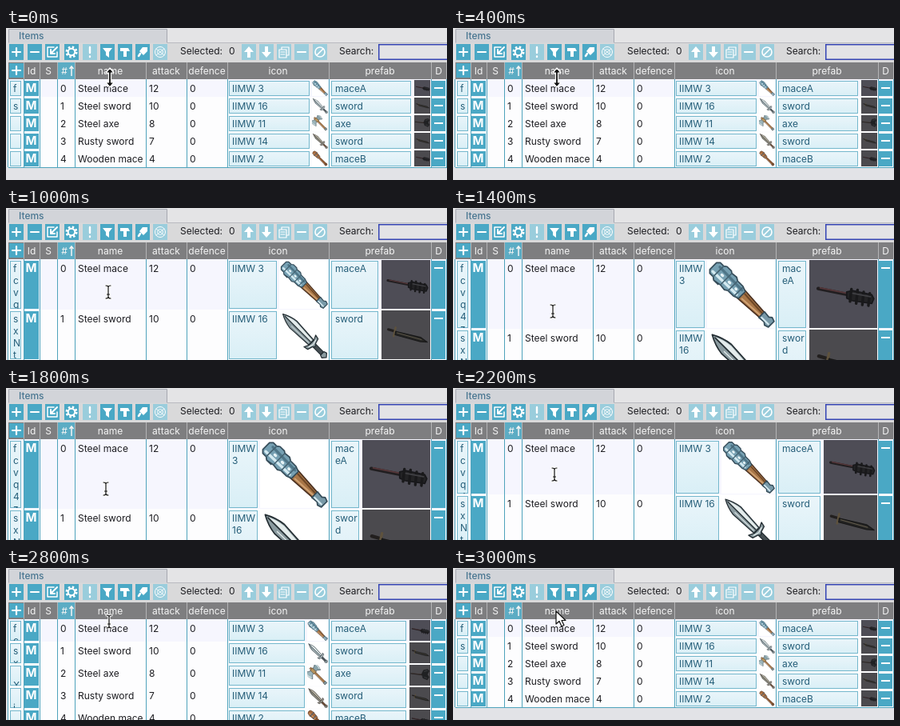
Recreate the animation shown at these times as an HTML page with a canvas. Size 552 px wide and 190 px high, loop 3200 ms.

```html
<!DOCTYPE html>
<html lang="en">
<head>
<meta charset="utf-8">
<title>Item table</title>
<style>
html, body { margin: 0; width: 100%; height: 100%; overflow: hidden; background: #e2e3e7; }
canvas { display: block; }
</style>
</head>
<body>
<canvas id="stage" width="552" height="190"></canvas>
<script>
const c = document.getElementById('stage').getContext('2d');
const TEAL = '#4aa8c5', LINE = '#4fa3bc', INK = '#1c1c20', TOP = 64;
const STEP = 200, LOOP = 3200;

// Row height and pointer x for each step
const heights = [22, 22, 22, 30, 46, 63, 78, 87, 89, 87, 80, 69, 55, 42, 28, 22];
const pointerX = [130, 130, 130, 129, 129, 128, 126, 125, 124, 125, 126, 127, 128, 129, 129, 129];

const edges = [3, 22, 42, 64, 86, 175, 226, 277, 404, 532, 551];
const titles = ['', 'Id', 'S', '#', 'name', 'attack', 'defence', 'icon', 'prefab', 'D'];
const rows = [
  { id: 'fcvq4z', name: 'Steel mace', attack: 12, icon: 'IIMW 3', prefab: 'maceA', art: mace, model: 'mace' },
  { id: 'sxNtLe', name: 'Steel sword', attack: 10, icon: 'IIMW 16', prefab: 'sword', art: sword, model: 'sword' },
  { id: ' XkR', name: 'Steel axe', attack: 8, icon: 'IIMW 11', prefab: 'axe', art: axe, model: 'axe' },
  { id: ' jw', name: 'Rusty sword', attack: 7, icon: 'IIMW 14', prefab: 'sword', art: rustySword, model: 'sword' },
  { id: ' pe', name: 'Wooden mace', attack: 4, icon: 'IIMW 2', prefab: 'maceB', art: woodMace, model: 'mace' }
];

function rect(x, y, w, h, color) {
  c.fillStyle = color;
  c.fillRect(x, y, w, h);
}

function text(s, x, y, color = INK, align = 'left', font = '12px') {
  c.font = font + ' Inter, sans-serif';
  c.textAlign = align;
  c.textBaseline = 'middle';
  c.fillStyle = color;
  c.fillText(s, x, y);
}

function stroke(d, color, width) {
  c.strokeStyle = color;
  c.lineWidth = width;
  c.stroke(new Path2D(d));
}

function fill(d, color) {
  c.fillStyle = color;
  c.fill(new Path2D(d));
}

function shape(d, color, edge = '#26363f', width = 2) {
  fill(d, color);
  stroke(d, edge, width);
}

// Run a drawing in local coordinates, clipped to a box if given
function at(x, y, scale, draw, w, h) {
  c.save();
  c.translate(x, y);
  c.scale(scale, scale);
  if (w) {
    c.beginPath();
    c.rect(0, 0, w, h);
    c.clip();
  }
  c.lineCap = c.lineJoin = 'round';
  draw();
  c.restore();
}

// Weapons on a 100 x 100 field, pointing up before the 45 degree turn
function tilted(draw) {
  c.translate(50, 50);
  c.rotate(-Math.PI / 4);
  draw();
}

function mace() {
  tilted(() => {
    shape('M-8 0H8L5 46H-5Z', '#a87647', '#4a3020');
    stroke('M-4 6L-2 42', '#d0a273', 2.5);
    stroke('M4 4L2 44', '#704928', 2.5);
    shape('M-11 -54L-7 -58H7L11 -54V-47L14 -43V-34L12 -31L13 -22L10 -17L10 -6L7 2H-7L-10 -6L-10 -17L-13 -22L-12 -31L-14 -43V-34V-43L-11 -47Z', '#76a0b2', '#344b58');
    stroke('M-6 -53L-5 -4', '#d4eaf1', 4);
    stroke('M6 -50L5 -3', '#4f7688', 4);
    stroke('M-11 -47H11M-11 -31H11M-10 -17H10M-8 -5H8', '#466473', 2);
    stroke('M0 -40V-38M0 -25V-23M0 -11V-10', '#e5f2f5', 4);
    shape('M-6 43H6L5 53L8 57L6 63H-6L-8 57L-5 53Z', '#7899a8', '#344b58');
    stroke('M-3 46V60', '#d4e8ef', 2.5);
  });
}

function blade(main, light, dark, grip) {
  tilted(() => {
    shape('M0 -60Q8 -46 10 -30L7 22H-7L-10 -30Q-8 -46 0 -60Z', main, dark);
    fill('M0 -56Q7 -42 8 -28L5 20H1Z', light);
    stroke('M-5 -30L-4 18', light, 1.5);
    stroke('M0 -54V20', dark, 2);
    shape('M-4 27H4L4 54H-4Z', grip, dark);
    shape('M-17 18L-15 27L-5 30L0 34L5 30L15 27L17 18L7 23H-7Z', main, dark);
    shape('M-5 54H5L7 60L0 66L-7 60Z', main, dark);
    stroke('M-10 25L0 28L10 25', light, 2);
  });
}

function sword() { blade('#8b9ba0', '#e4ecec', '#242e33', '#454e52'); }
function rustySword() { blade('#7b7d75', '#b5b0a0', '#3a312b', '#66432c'); }

function axe() {
  tilted(() => {
    shape('M-4 -50H4L5 56H-5Z', '#a97848', '#4b3420');
    shape('M-4 -38L-18 -42L-32 -54Q-42 -30 -30 -4L-16 -18L-4 -20Z', '#9cb5bb');
    shape('M4 -38L18 -42L30 -50Q38 -30 28 -8L16 -18L4 -20Z', '#89a3aa');
    stroke('M-32 -46Q-38 -30 -30 -12M30 -44Q34 -30 28 -16', '#e1edee', 4);
    shape('M-7 -42H7V-16H-7Z', '#b6925b', '#4b3420');
    shape('M-6 46H6V58H-6Z', '#8299a0');
  });
}

function woodMace() {
  tilted(() => {
    shape('M-5 -8H5L6 54H-6Z', '#8c562f', '#46291a');
    shape('M-9 -56Q0 -64 9 -56L13 -42L9 -8H-9L-13 -42Z', '#a5693b', '#46291a');
    stroke('M-5 -50L-4 -14', '#d09a68', 4);
    stroke('M-12 -38H12M-10 -20H10', '#59616a', 5);
    shape('M-7 48H7L5 60H-5Z', '#7d5235', '#46291a');
  });
}

const models = {
  mace() {
    stroke('M13 42L58 51', '#211e20', 5);
    stroke('M16 41L56 49', '#56373a', 2);
    shape('M55 47L64 45L92 51L95 57L92 64L64 60L55 56Z', '#232325', '#17171a');
    stroke('M62 43L60 61M71 44L69 64M80 47L78 66M89 49L87 67', '#19191b', 4);
    stroke('M64 49L90 54', '#404044', 2);
  },
  sword() {
    stroke('M14 39L28 43', '#221f1e', 5);
    stroke('M29 35L25 53', '#5e523d', 4);
    shape('M29 43L80 55L94 65L80 64L28 50Z', '#252524', '#191919');
    stroke('M32 46L82 60', '#625b4b', 1.5);
  },
  axe() {
    stroke('M8 42L80 50', '#211e1e', 5);
    stroke('M12 41L60 46', '#4b3b34', 2);
    shape('M60 42L68 26L88 22L95 30L86 46L94 60L86 72L66 64Z', '#202123', '#161618');
    stroke('M72 32L86 28M72 60L84 64', '#444549', 3);
  }
};

// Toolbar glyphs on an 18 x 20 tile
const glyph = {
  plus: () => stroke('M4 10H14M9 5V15', '#fff', 2.2),
  minus: () => stroke('M4 10H14', '#fff', 2.2),
  pick() {
    stroke('M11 4H3V16H15V10', '#fff', 1.5);
    stroke('M15 4L7 12M7 7V12H12', '#fff', 2);
  },
  gear() {
    c.lineCap = 'butt';
    c.setLineDash([2.4, 2.31]);
    stroke('M15 10A6 6 0 1 1 3 10A6 6 0 1 1 15 10', '#fff', 3);
    c.setLineDash([]);
    stroke('M13.3 10A4.3 4.3 0 1 1 4.7 10A4.3 4.3 0 1 1 13.3 10', '#fff', 2);
  },
  alert: () => stroke('M9 4V11M9 15.5V16', '#fff', 2.4),
  filter: () => fill('M3 5H15L11 10V17L7 14V10Z', '#fff'),
  hammer: () => fill('M3 5H13L15 9H11V16H7V9H3Z', '#fff'),
  brush() {
    fill('M9 4H15V9L10 14L5 9Z', '#fff');
    stroke('M6 12L4 15', '#fff', 2.5);
  },
  spiral() {
    stroke('M15.5 10A6.5 6.5 0 1 1 2.5 10A6.5 6.5 0 1 1 15.5 10', '#fff', 1);
    stroke('M12.5 10A3.5 3.5 0 1 1 5.5 10A3.5 3.5 0 1 1 12.5 10M4 6L14 14M14 6L4 14', '#fff', 0.8);
  },
  up: () => fill('M9 3L15 10H11V17H7V10H3Z', '#fff'),
  down: () => fill('M9 17L15 10H11V3H7V10H3Z', '#fff'),
  copy: () => stroke('M3 7H12V17H3ZM6 7V4H15V14H12M5 10H10M5 13H10', '#fff', 1.2),
  none: () => stroke('M15 10A6 6 0 1 1 3 10A6 6 0 1 1 15 10M5 14L13 6', '#fff', 1.6)
};

const tools = [
  [4, 'plus'], [27, 'minus'], [49, 'pick'], [73, 'gear'], [96, 'alert', 1], [118, 'filter'],
  [140, 'hammer'], [162, 'brush'], [184, 'spiral', 1], [295, 'up', 1], [317, 'down', 1],
  [339, 'copy', 1], [361, 'minus', 1], [384, 'none', 1]
];

function tile(x, y, w, h, name, pale) {
  rect(x, y, w, h, pale ? '#9acddc' : TEAL);
  at(x, y + (h - 20) / 2, 1, glyph[name]);
}

function toolbar() {
  rect(0, 0, 552, 43, '#e4e4e6');
  rect(3, 18, 549, 25, '#d9d9da');
  shape('M3.5 18.5V1.5H201.5V18.5', '#d2d4d9', '#a6a8b1', 1);
  rect(202, 18, 350, 1, '#b9bac0');
  text('Items', 16, 10, '#477590', 'left', '500 12px');
  for (const [x, name, pale] of tools) tile(x, 20, 18, 20, name, pale);
  text('Selected:', 218, 29);
  text('0', 279, 29);
  text('Search:', 417, 29);
  rect(466, 20, 90, 20, '#3544b4');
  rect(467.5, 21.5, 88, 17, '#e3e3e6');
}

function header() {
  rect(3, 43, 549, 21, '#7e7e80');
  rect(64, 43, 22, 21, '#5cacc4');
  tile(4, 44, 18, 18, 'plus');
  titles.forEach((s, i) => {
    text(s, (edges[i] + edges[i + 1]) / 2 - (s === '#' ? 2 : 0), 54, '#f4f4f4', 'center');
    rect(edges[i + 1], 43, 1, 21, '#b4b4b6');
  });
  stroke('M82 60V48M79.5 51L82 48L84.5 51', '#f4f4f4', 1.5);
}

// Break at spaces first, then inside words that are still too wide
function wrap(s, width) {
  c.font = '12px Inter, sans-serif';
  const fits = t => c.measureText(t).width <= width;
  if (fits(s)) return [s];
  const lines = [];
  for (const word of s.split(' ')) {
    let line = '';
    for (const ch of word) {
      if (line && !fits(line + ch)) {
        lines.push(line);
        line = '';
      }
      line += ch;
    }
    lines.push(line);
  }
  return lines;
}

function button(x, y, w, h, lines, pad) {
  at(x, y, 1, () => {
    const shade = c.createLinearGradient(0, 0, 0, h);
    shade.addColorStop(0, '#eaf5fa');
    shade.addColorStop(1, '#d9eff6');
    rect(0, 0, w, h, '#74b7cc');
    rect(1, 1, w - 2, h - 2, shade);
    lines.forEach((s, i) => text(s, pad, 10.5 + 15 * i, '#245d78'));
  }, w, h);
}

function drawRow(row, i, h) {
  const y = TOP + i * h, size = h - 2, mid = y + 12;
  if (y > 190) return;
  rect(3, y, 549, h, i ? '#fdfdfe' : '#f6f6fe');
  button(5, y + 2, 14, h - 3, [...row.id], 4);
  rect(23, y + 2, 18, h - 3, TEAL);
  text('M', 31.5, mid - 1, '#fff', 'center', 'bold 15px');
  text(i, 68, mid);
  text(row.name, 90, mid);
  text(row.attack, 179, mid);
  text('0', 230, mid);

  const iconW = 121 - size, prefabW = 120 - size;
  button(279, y + 2, iconW, h - 3, wrap(row.icon, iconW - 5), 4);
  rect(403 - size, y + 1, size, size, '#fff');
  at(403 - size, y + 1, size / 100, row.art, 100, 100);
  button(407, y + 2, prefabW, h - 3, wrap(row.prefab, prefabW - 7), 5);
  rect(531 - size, y + 1, size, size, i ? '#4b4a4e' : '#4e4d56');
  at(531 - size, y + 1, size / 100, models[row.model], 100, 100);

  rect(533, y + 2, 17, h - 3, TEAL);
  rect(536, y + 10, 11, 2, '#fff');
  rect(3, y + h, 549, 1, LINE);
}

function pointer(step, h) {
  const x = pointerX[step];
  if (step < 3) {
    at(x, 62, 1, () => shape('M0 -12L5 -6H1.5V6H5L0 12L-5 6H-1.5V-6H-5Z', '#111', '#fff', 1.2));
  } else if (step === 15) {
    at(x, 54, 1, () => shape('M0 0V16L4 12.5L7 19L10 17.5L7 11.5H12Z', '#fff', '#111', 1.2));
  } else {
    // The rows trail slightly behind the drag in each direction
    at(x, h + (step < 9 ? 42 : 39), 1, () => {
      const beam = 'M-3 -8Q0 -8 0 -6Q0 -8 3 -8M0 -6V6M-3 8Q0 8 0 6Q0 8 3 8M-1.5 3H1.5';
      stroke(beam, '#fff', 3.2);
      stroke(beam, '#111', 1.2);
    });
  }
}

function draw(now) {
  const step = Math.floor(now % LOOP / STEP), h = heights[step];
  rect(0, 0, 552, 190, '#e2e3e7');
  rows.forEach((row, i) => drawRow(row, i, h));
  for (const x of edges) rect(x - (x === 3 ? 1 : 0), TOP, 1, Math.min(5 * h, 126), LINE);
  toolbar();
  header();
  pointer(step, h);
}

const start = performance.now();
function frame() {
  draw(performance.now() - start);
  requestAnimationFrame(frame);
}
frame();
</script>
</body>
</html>
```
